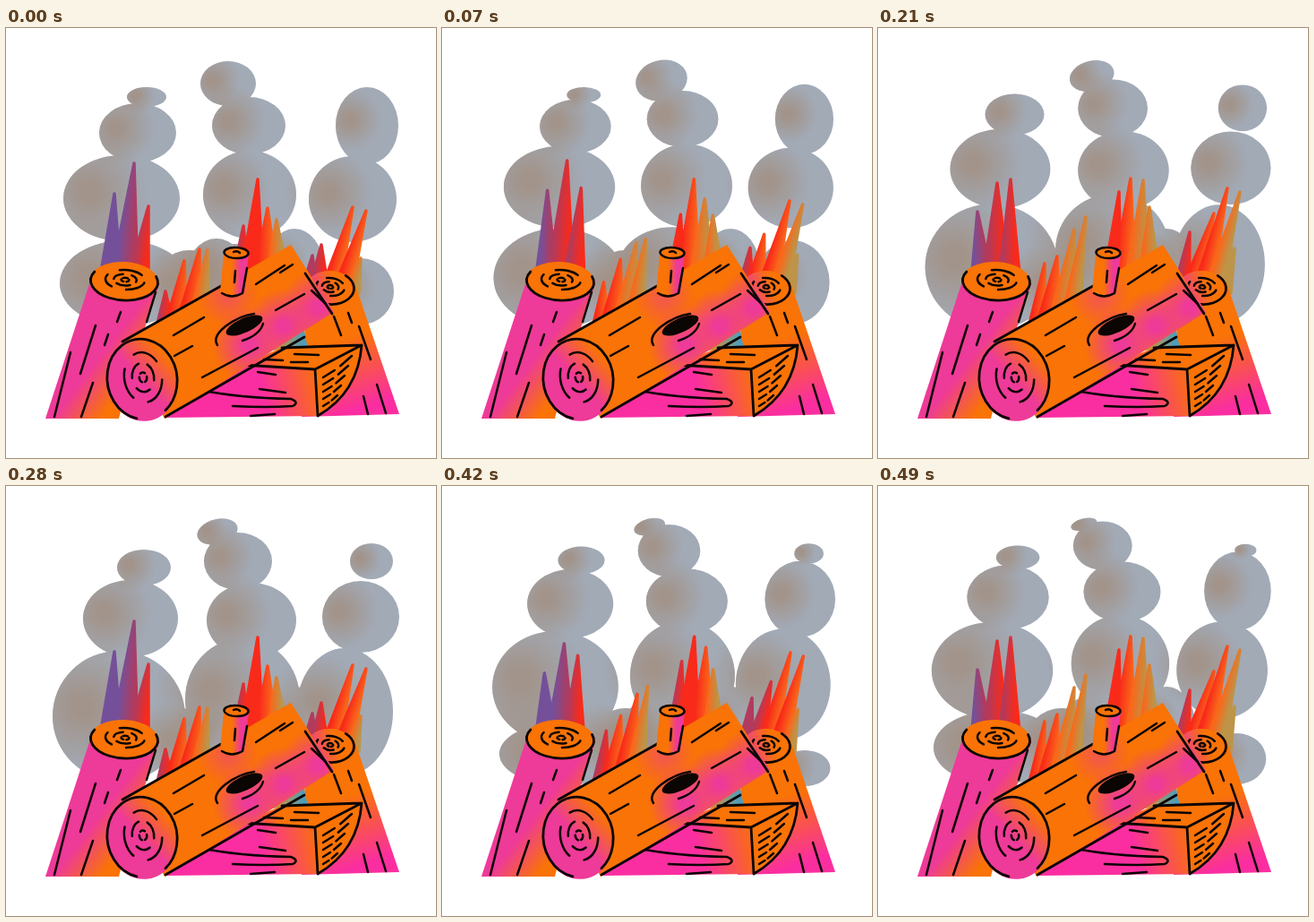
Animation, 480 px wide and 480 px high, one loop 0.56 s. Source, as an HTML page with a canvas:

```html
<!DOCTYPE html>
<html lang="en">
<head>
<meta charset="utf-8">
<title>Campfire</title>
<style>
html, body { margin: 0; width: 100%; height: 100%; overflow: hidden; background: #fff; }
canvas { display: block; width: 100vmin; height: 100vmin; }
</style>
</head>
<body>
<canvas id="stage" width="480" height="480"></canvas>
<script>
const ctx = document.getElementById('stage').getContext('2d');
const STEP = 70, STEPS = 8, POSES = 4, KEY_GAP = 4;
const ORANGE = '#f97306', PINK = '#ee3a98', HOT = '#fa2ea0', INK = '#0b0504';
const HEAT = ['#74509a', '#b23a5c', '#f92a1a', '#f9681a', '#bd9448'];

// A puff rises through these points (x, y, rx, ry), one every KEY_GAP steps
const columns = [
  { end: 25, path: [[132, 285, 72, 48], [126, 257, 74, 73], [129, 190, 65, 48], [139, 148, 53, 43],
    [147, 117, 43, 33], [154, 91, 30, 20], [157, 77, 22, 11], [163, 70, 8, 2]] },
  { end: 31, path: [[255, 275, 58, 34], [264, 238, 64, 68], [272, 186, 52, 49], [274, 150, 50, 42],
    [271, 109, 41, 32], [259, 84, 38, 32], [248, 62, 31, 25], [236, 51, 23, 14], [228, 40, 12, 4]] },
  { end: 23, path: [[396, 294, 37, 37], [378, 252, 54, 71], [387, 191, 49, 48], [396, 146, 43, 40],
    [403, 109, 35, 43], [408, 84, 24, 20], [411, 68, 8, 3]] }
];
const basePuffs = [[205, 290, 42, 42], [235, 280, 35, 45], [322, 266, 32, 42]];

// Catmull-Rom through the path, extended in a straight line at both ends
function along(path, age) {
  const n = Math.max(0, Math.min(path.length - 2, Math.floor(age / KEY_GAP)));
  const u = age / KEY_GAP - n;
  return path[n].map((b, i) => {
    const c = path[n + 1][i];
    if (u < 0) return b + (c - b) * u;
    const a = n ? path[n - 1][i] : 2 * b - c;
    const d = path[n + 2] ? path[n + 2][i] : 2 * c - b;
    return b + u / 2 * (c - a + u * (2 * a - 5 * b + 4 * c - d + u * (3 * (b - c) + d - a)));
  });
}

function drawSmoke(step) {
  const puffs = [...basePuffs];
  for (const { path, end } of columns)
    for (let age = step < 6 ? step : step - STEPS; age <= end; age += STEPS)
      puffs.push(along(path, age));

  ctx.save();
  ctx.beginPath();
  for (const [x, y, rx, ry] of puffs) {
    const tilt = rx < 30 && x > 200 && x < 300 ? -0.25 : 0;
    ctx.moveTo(x + rx * Math.cos(tilt), y + rx * Math.sin(tilt));
    ctx.ellipse(x, y, rx, ry, tilt, 0, 7);
  }
  ctx.clip();
  ctx.fillStyle = '#a2aab6';
  ctx.fillRect(40, 20, 410, 325);
  for (const [x, y, rx, ry] of puffs)
    glow(x - rx * 0.55, y - ry * 0.15, rx, 'rgba(162,144,131,.85)', 'rgba(162,144,131,0)');
  ctx.restore();
}

function glow(x, y, r, inner, outer) {
  const g = ctx.createRadialGradient(x, y, 0, x, y, r);
  g.addColorStop(0.15, inner);
  g.addColorStop(1, outer);
  ctx.fillStyle = g;
  ctx.fillRect(x - r, y - r, 2 * r, 2 * r);
}

// Every spike tip travels from its first point to its second, then snaps back
const fires = [
  { base: [104, 284, 159, 286], heat: 0, lift: 12,
    spikes: [[121, 184, 111, 204], [143, 150, 133, 172], [159, 198, 148, 168]] },
  { base: [166, 342, 226, 308], heat: 1.5, lift: 0,
    spikes: [[178, 293, 186, 262], [199, 259, 200, 254], [216, 246, 219, 224], [225, 247, 232, 210]] },
  { base: [250, 290, 313, 268], heat: 1.4, lift: 0,
    spikes: [[265, 220, 269, 182], [281, 168, 282, 167], [292, 200, 296, 169], [302, 213, 303, 199]] },
  { base: [330, 292, 394, 296], heat: 1, lift: 0,
    spikes: [[342, 253, 348, 227], [352, 241, 375, 206], [387, 199, 390, 178],
      [402, 203, 404, 182], [396, 256, 398, 245]] }
];

function drawFire({ base: [x0, y0, x1, y1], heat, lift, spikes }, pose) {
  const u = pose / (POSES - 1), n = spikes.length;
  const at = v => [x0 + (x1 - x0) * v, y0 + (y1 - y0) * v];
  const tone = v => HEAT[Math.min(HEAT.length - 1, Math.floor(v))];
  ctx.lineJoin = 'round';
  ctx.lineWidth = 3.5;
  spikes.forEach(([ax, ay, bx, by], i) => {
    const x = ax + (bx - ax) * u, y = ay + (by - ay) * u - lift * Math.sin(u * 2 * Math.PI);
    const a = at(Math.max(0, (i - 0.35) / n)), b = at(Math.min(1, (i + 1.35) / n));
    // The gradient runs across the spike, square to its leaning axis
    const mx = (a[0] + b[0]) / 2, my = (a[1] + b[1]) / 2;
    const dx = x - mx, dy = y - my, scale = (b[0] - a[0]) / 2 / Math.hypot(dx, dy);
    const nx = -dy * scale, ny = dx * scale;
    const g = ctx.createLinearGradient(mx - nx, my - ny, mx + nx, my + ny);
    const warmth = heat + i * 0.6 + pose % 2 * 0.6;
    g.addColorStop(0.2, tone(warmth));
    g.addColorStop(0.75, tone(warmth + 0.9));
    ctx.fillStyle = ctx.strokeStyle = g;
    ctx.beginPath();
    ctx.moveTo(...a);
    ctx.lineTo(x, y + 1);
    ctx.lineTo(...b);
    ctx.closePath();
    ctx.fill();
    ctx.stroke();
  });
}

function shade(x0, y0, x1, y1, from, to) {
  const g = ctx.createLinearGradient(x0, y0, x1, y1);
  g.addColorStop(0, from);
  g.addColorStop(1, to);
  return g;
}
function fill(d, style) {
  ctx.fillStyle = style;
  ctx.fill(new Path2D(d));
}
function ink(d, width = 2.5) {
  ctx.strokeStyle = INK;
  ctx.lineWidth = width;
  ctx.lineCap = ctx.lineJoin = 'round';
  ctx.stroke(new Path2D(d));
}
function oval(x, y, rx, ry, rot, style) {
  ctx.beginPath();
  ctx.ellipse(x, y, rx, ry, rot, 0, 7);
  ctx.fillStyle = style;
  ctx.fill();
}
function arc(x, y, rx, ry, rot, from, to, width = 2.5) {
  ctx.beginPath();
  ctx.ellipse(x, y, rx, ry, rot, from, to);
  ctx.strokeStyle = INK;
  ctx.lineWidth = width;
  ctx.lineCap = 'round';
  ctx.stroke();
}
// Broken growth rings, each turned against the one outside it
function rings(x, y, rx, ry, rot) {
  for (const [size, turn] of [[1, 0.2], [0.58, 1.1], [0.2, 2]])
    for (let k = 0; k < 3; k++) {
      const from = turn + k * 2.1;
      arc(x, y, rx * size, ry * size, rot, from, from + 1.3);
    }
}

function drawLeftLog() {
  fill('M94 283L44 436H126L140 380L171 286Z', shade(104, 368, 138, 394, PINK, ORANGE));
  oval(132, 283, 38.5, 22, 0.05, ORANGE);
  arc(132, 283, 37.5, 21, 0.05, -0.35, 3.6, 2.8);
  rings(133, 281, 22, 11, 0.05);
  ink('M100 332L83 386M72 362L54 434M97 396L84 434M128 317L124 328M114 342L110 354M167 295L157 328');
}

function drawRightLog() {
  fill('M335 286L330 434L439 431L389 284Z', shade(366, 350, 390, 425, ORANGE, HOT));
  oval(362, 290, 27, 19, 0.05, shade(338, 295, 368, 285, PINK, ORANGE));
  arc(362, 290, 26.5, 18.5, 0.05, -0.9, 1.6, 2.8);
  rings(362, 289, 16, 10, 0.1);
  ink('M382 318L386 329M366 322L374 343M394 333L407 370M414 398L424 430M399 411L404 431');
}

function drawWedge() {
  fill('M296 360L330 325L337 358Z', shade(306, 350, 334, 350, HEAT[4], '#459fc6'));
  fill('M178 435L262 375L345 381L349 433Z', shade(285, 400, 350, 384, HOT, ORANGE));
  fill('M258 378L310 356L397 354L345 381Z', shade(262, 378, 305, 362, HOT, ORANGE));
  fill('M345 381L397 354Q394 408 349 433Z', ORANGE);
  ink('M263 376L345 381L397 354L308 357M345 381L348 433Q393 407 397 354', 2.8);
  ink('M216 404Q260 413 318 414Q328 418 320 422Q290 424 253 422' +
    'M283 403L312 407M273 433L300 431M281 384L301 387M288 370L309 371M318 373L337 373M322 364L349 365');
  // Grain on the split face fans out from its upper corner
  for (let k = 0; k < 5; k++) {
    const y = 390 + k * 8, reach = 32 - k * 4;
    ink(`M354 ${y}L${354 + reach * 0.4} ${y - reach * 0.25}M${354 + reach * 0.6} ${y - reach * 0.4}L${354 + reach} ${y - reach * 0.75}`);
  }
}

function drawMainLog() {
  const body = 'M130 350L318 242L366 317L177 436Z';
  fill(body, ORANGE);
  ctx.save();
  ctx.clip(new Path2D(body));
  for (let k = 0; k < 3; k++) glow(272 + k * 38, 354 - k * 21, 42, PINK, 'rgba(238,58,152,0)');
  glow(248, 300, 34, 'rgba(238,58,152,.45)', 'rgba(238,58,152,0)');
  ctx.restore();
  oval(152, 392, 40, 47, -0.15, shade(150, 392, 178, 366, PINK, ORANGE));
  arc(152, 392, 39, 45, -0.15, 1.9, 7.3, 2.8);
  rings(153, 390, 21, 28, -0.15);
  ink('M130 350L240 288M178 434L333 345M334 274L364 319', 2.8);
  ink('M187 343L221 323M188 366L208 355M219 390L281 357' +
    'M279 286L311 265M306 273L320 264M301 315L333 297M341 293L357 308');
  oval(266, 332, 22, 8, -0.42, INK);
  ink('M236 354Q230 345 245 333Q261 321 277 319M264 349Q283 343 287 330');
}

function drawStub() {
  fill('M243 252L239 295Q252 305 266 295L271 252Z', shade(252, 0, 262, 0, ORANGE, PINK));
  oval(257, 251, 14, 6.5, 0.05, ORANGE);
  arc(257, 251, 13.5, 6, 0.05, -3.3, 2.8);
  ink('M254 250Q258 248 261 251M241 296Q252 303 264 296L269 268M256 271L255 284');
}

function draw(now) {
  const step = Math.floor(now / STEP) % STEPS;
  ctx.fillStyle = '#fff';
  ctx.fillRect(0, 0, 480, 480);
  drawSmoke(step);
  for (const fire of fires) drawFire(fire, step % POSES);
  drawLeftLog();
  drawRightLog();
  drawWedge();
  drawMainLog();
  drawStub();
}

const start = performance.now();
function tick() {
  draw(performance.now() - start);
  requestAnimationFrame(tick);
}
tick();
</script>
</body>
</html>
```
